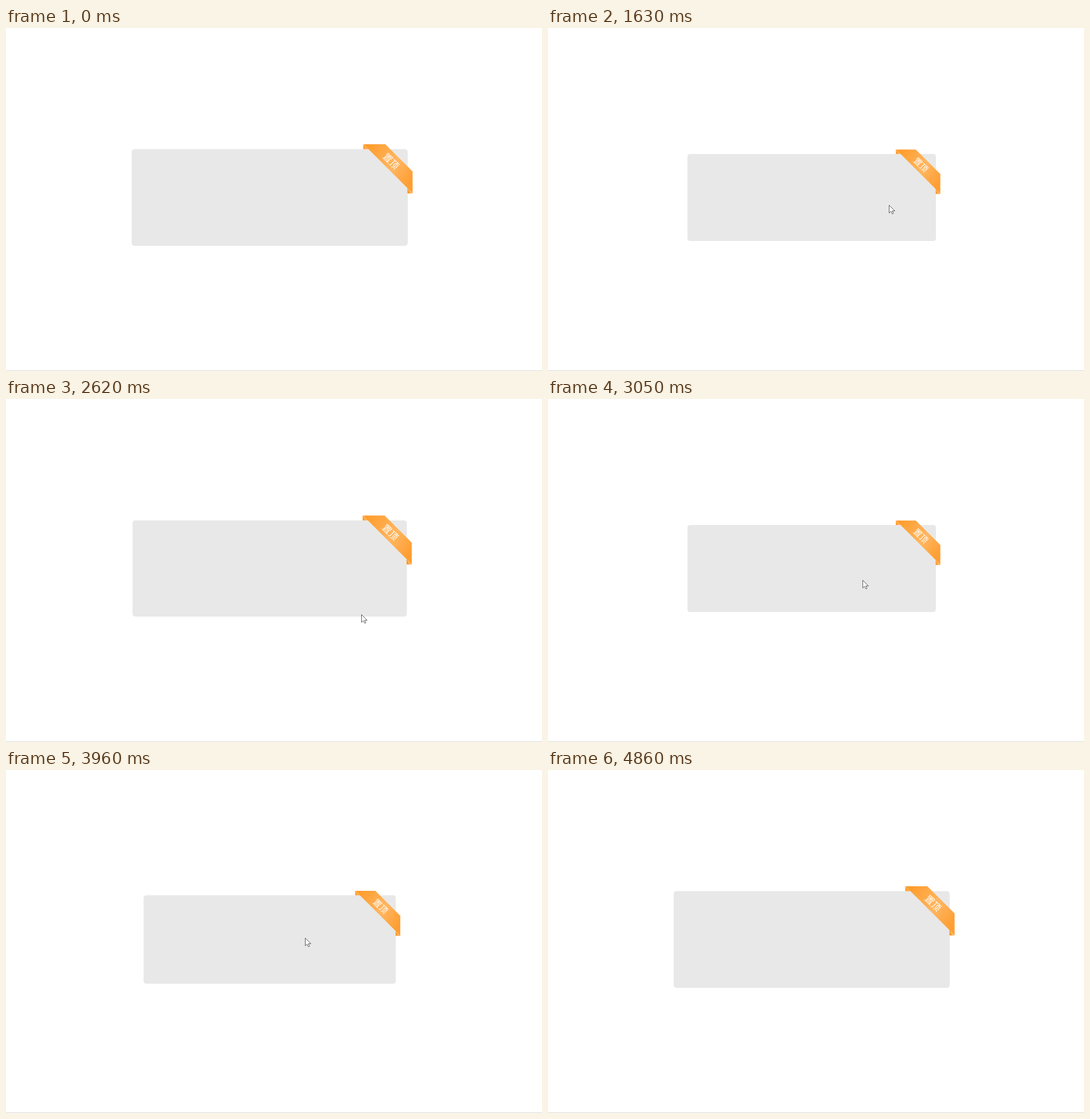
Recreate the animation shown at these times as an HTML page. Size 934 by 599 pixels, loop 5.88 s.

```html
<!DOCTYPE html>
<html lang="zh-CN">
<head>
<meta charset="utf-8">
<title>Pinned card</title>
<style>
html, body { margin: 0; width: 100%; height: 100%; overflow: hidden; background: #fff; }
svg { display: block; width: 934px; height: 599px; }
text { font: 16px "Noto Sans CJK SC", "Noto Sans CJK", sans-serif; fill: #fff; text-anchor: middle; }
</style>
</head>
<body>
<svg viewBox="0 0 934 599">
  <defs>
    <linearGradient id="band" gradientUnits="userSpaceOnUse" x1="630" y1="205" x2="710" y2="262">
      <stop offset="0" stop-color="#ff9c2b"/>
      <stop offset=".58" stop-color="#ffb661"/>
      <stop offset="1" stop-color="#ff9e32"/>
    </linearGradient>
  </defs>
  <rect y="598" width="934" height="1" fill="#d9d9d9"/>
  <g id="card">
    <rect x="219" y="211.5" width="481" height="169" rx="5" fill="#e8e8e8"/>
    <path d="M622.5 203V211.5H632ZM699.5 279.5V289H708.5Z" fill="#ff9926"/>
    <path d="M622.5 203L627 211.5H632ZM699.5 279.5L704 289H708.5Z" fill="#ffb561"/>
    <path d="M623 203H661L708.5 250.5V288.5Z" fill="url(#band)"/>
    <text transform="translate(671 232.5) rotate(45)" y="6">置顶</text>
  </g>
  <path id="cursor" d="M.5 .5V14L3.6 11.1L5.9 15.6L8 14.7L5.8 10.4H10.3Z" fill="#fff" stroke="#333" stroke-width=".8"/>
</svg>
<script>
const LOOP = 5880, HOVER_MS = 250, SHRINK = 0.1;
const box = { cx: 459.5, cy: 296, w: 481, h: 169 };

const easeOut = p => 1 - (1 - p) ** 3;
const easeInOut = p => p * p * (3 - 2 * p);

// The pointer goes from one resting place to the next
const entry = { x: 908, y: 459 };
const moves = [
  { start: 1260, end: 1710, x: 592, y: 308, ease: easeOut },
  { start: 1870, end: 2210, x: 693, y: 466 },
  { start: 2250, end: 2450, x: 640, y: 394 },
  { start: 2490, end: 2910, x: 548, y: 316 },
  { start: 3050, end: 3540, x: 581, y: 434 },
  { start: 3710, end: 3970, x: 521, y: 293 },
  { start: 4400, end: 4860, x: 930, y: 542 }
];
const shownFrom = moves[0].start, shownUntil = moves.at(-1).end;

function pointerAt(t) {
  if (t < shownFrom || t >= shownUntil) return null;
  const i = moves.findLastIndex(move => t >= move.start);
  const { start, end, x, y, ease = easeInOut } = moves[i];
  const from = moves[i - 1] || entry;
  const p = ease(Math.min(1, (t - start) / (end - start)));
  return { x: Math.round(from.x + (x - from.x) * p), y: Math.round(from.y + (y - from.y) * p) };
}

// CSS "ease": cubic-bezier(.25, .1, .25, 1)
function cssEase(x) {
  if (x >= 1) return 1;
  const bezier = (u, a, b) => 3 * u * (1 - u) ** 2 * a + 3 * u * u * (1 - u) * b + u ** 3;
  let low = 0, high = 1;
  for (let i = 0; i < 20; i++) {
    const mid = (low + high) / 2;
    if (bezier(mid, 0.25, 0.25) < x) low = mid; else high = mid;
  }
  return bezier(low, 0.1, 1);
}

// Times at which the pointer enters and leaves the card, in turn
const crossings = [];

function cardScale(t) {
  const i = crossings.findLastIndex(time => t >= time);
  if (i < 0) return 1;
  const p = cssEase((t - crossings[i]) / HOVER_MS);
  return 1 - SHRINK * (i % 2 ? 1 - p : p);
}

function isHovered(t) {
  const point = pointerAt(t);
  const half = cardScale(t) / 2;
  return point !== null
    && Math.abs(point.x - box.cx) < box.w * half
    && Math.abs(point.y - box.cy) < box.h * half;
}

for (let t = shownFrom; t <= shownUntil; t++) {
  const wasHovered = crossings.length % 2 === 1;
  if (isHovered(t) !== wasHovered) crossings.push(t);
}

const card = document.getElementById("card");
const cursor = document.getElementById("cursor");

function draw(t) {
  const { cx, cy } = box;
  card.setAttribute("transform", `translate(${cx} ${cy}) scale(${cardScale(t)}) translate(${-cx} ${-cy})`);
  const point = pointerAt(t);
  cursor.style.display = point ? "" : "none";
  if (point) cursor.setAttribute("transform", `translate(${point.x} ${point.y})`);
}

const origin = performance.now();
function tick() {
  draw((performance.now() - origin) % LOOP);
  requestAnimationFrame(tick);
}
tick();
</script>
</body>
</html>
```
